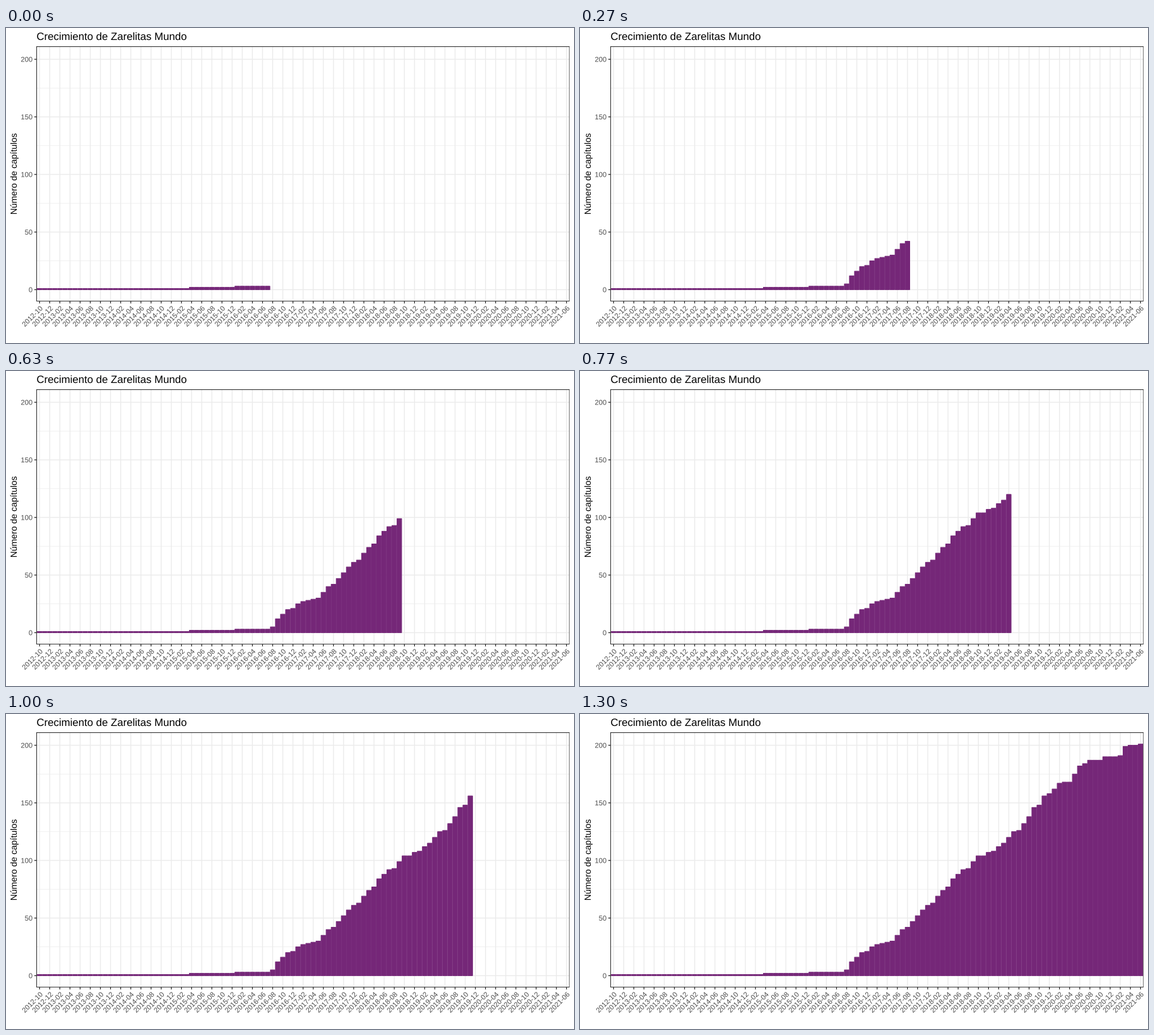
Animation, 900 px wide and 500 px high, one loop 3.33 s. Source, as a matplotlib script:

```python
import matplotlib.pyplot as plt
import numpy as np
from matplotlib.animation import FuncAnimation
from matplotlib.collections import LineCollection, PathCollection, PolyCollection
from matplotlib.patches import Rectangle
from matplotlib.textpath import TextPath
from matplotlib.transforms import Affine2D

WIDTH, HEIGHT, DPI = 900, 500, 100
PX = 72 / DPI  # points per pixel
LEFT, RIGHT, TOP, BOTTOM = 48.4, 893, 29.4, 433.7
PURPLE = "#752778"
LINE = 1.36

TICK_MS, LOOP_MS = 10, 3330
REVEAL_STEPS = 39

# Chapters per month from 2012-10 to 2021-06
counts = np.array(
    [1] * 30 + [2] * 9 + [3] * 7
    + [5, 12, 16, 20, 21, 25, 27, 28, 29, 30, 35, 40, 42]
    + [47, 52, 57, 61, 63, 69, 74, 77, 84, 88, 92, 93, 99]
    + [104, 104, 107, 108, 112, 115, 120, 125, 126, 132, 138, 146, 148, 156]
    + [158, 162, 167, 168, 168, 175, 182, 184, 187, 187, 187]
    + [190, 190, 190, 191, 199, 200, 200, 201]
)
# A bar appears when the sweep over the counts reaches its height
reveal_step = np.rint((counts - 1) / (counts.max() - 1) * REVEAL_STEPS)

month_width = (RIGHT - LEFT) / (len(counts) + 0.2)
unit = (BOTTOM - TOP) / (counts.max() * 1.1)


def x_at(month):
    return LEFT + (month + 0.6) * month_width


def y_at(value):
    return BOTTOM - (value + 0.05 * counts.max()) * unit


def bar(month, value):
    x0, x1 = x_at(month - 0.45), x_at(month + 0.45)
    y0, y1 = y_at(0), y_at(value)
    return [(x0, y0), (x0, y1), (x1, y1), (x1, y0)]


def glyphs(text, x, y, size, align=0.0, angle=0):
    """Outline of a text with its baseline anchored at (x, y)."""
    path = TextPath((0, 0), text, size=size, prop={"family": "Liberation Sans"})
    width = path.get_extents().x1 + 0.04 * size
    place = Affine2D().translate(-align * width, 0).scale(1, -1)
    return place.rotate_deg(-angle).translate(x, y).transform_path(path)


fig = plt.figure(figsize=(WIDTH / DPI, HEIGHT / DPI), dpi=DPI, facecolor="white")
ax = fig.add_axes([0, 0, 1, 1])
ax.set_xlim(0, WIDTH)
ax.set_ylim(HEIGHT, 0)
ax.axis("off")

panel = Rectangle((LEFT, TOP), RIGHT - LEFT, BOTTOM - TOP, fill=False,
                  edgecolor="#333333", linewidth=LINE * PX, zorder=4,
                  joinstyle="miter", snap=False)
ax.add_patch(panel)
panel.set_clip_path(Rectangle((LEFT, TOP), RIGHT - LEFT, BOTTOM - TOP,
                              transform=ax.transData))


def add_lines(segments, color, width, zorder):
    lines = LineCollection(segments, colors=color, linewidths=width * PX,
                           zorder=zorder, capstyle="butt")
    lines.set_snap(False)
    ax.add_collection(lines, autolim=False)


def add_text(paths, color):
    ax.add_collection(PathCollection(paths, facecolors=color, linewidths=0,
                                     zorder=5), autolim=False)


def across(value):
    return [(LEFT, y_at(value)), (RIGHT, y_at(value))]


months = range(0, len(counts), 2)
values = range(0, 201, 50)

add_lines([across(v) for v in range(25, 200, 50)], "#EBEBEB", LINE / 2, 1)
add_lines([across(v) for v in values]
          + [[(x_at(m), TOP), (x_at(m), BOTTOM)] for m in months],
          "#EBEBEB", LINE, 1)
add_lines([[(LEFT - 3.5, y_at(v)), (LEFT, y_at(v))] for v in values]
          + [[(x_at(m), BOTTOM), (x_at(m), BOTTOM + 3.5)] for m in months],
          "#333333", LINE, 3)


def month_label(month):
    year, index = divmod(month + 9, 12)
    return f"{2012 + year}-{index + 1:02d}"


add_text([glyphs(str(v), LEFT - 6.3, y_at(v) + 4, 11.2, align=1) for v in values]
         + [glyphs(month_label(m), x_at(m) + 5.7, BOTTOM + 12, 11.2, align=1, angle=45)
            for m in months], "#4D4D4D")
add_text([glyphs("Crecimiento de Zarelitas Mundo", LEFT, 19, 16.8),
          glyphs("Número de capítulos", 17, (TOP + BOTTOM) / 2, 14,
                 align=0.5, angle=90)], "black")

bars = PolyCollection([], facecolors=PURPLE, edgecolors=PURPLE,
                      linewidths=1.067 * PX, joinstyle="miter", zorder=2)
bars.set_snap(False)
ax.add_collection(bars, autolim=False)
bars.set_clip_path(Rectangle((LEFT, TOP), RIGHT - LEFT, BOTTOM - TOP,
                             transform=ax.transData))
all_bars = [bar(m, c) for m, c in enumerate(counts)]


def update(tick):
    # 30 steps a second, each starting on a 10 ms tick
    step = int((tick + 0.5) * 0.3)
    bars.set_verts([b for b, s in zip(all_bars, reveal_step) if s <= step])
    return [bars]


anim = FuncAnimation(fig, update, frames=LOOP_MS // TICK_MS, interval=TICK_MS,
                     repeat=True, repeat_delay=0)
plt.show()
```
